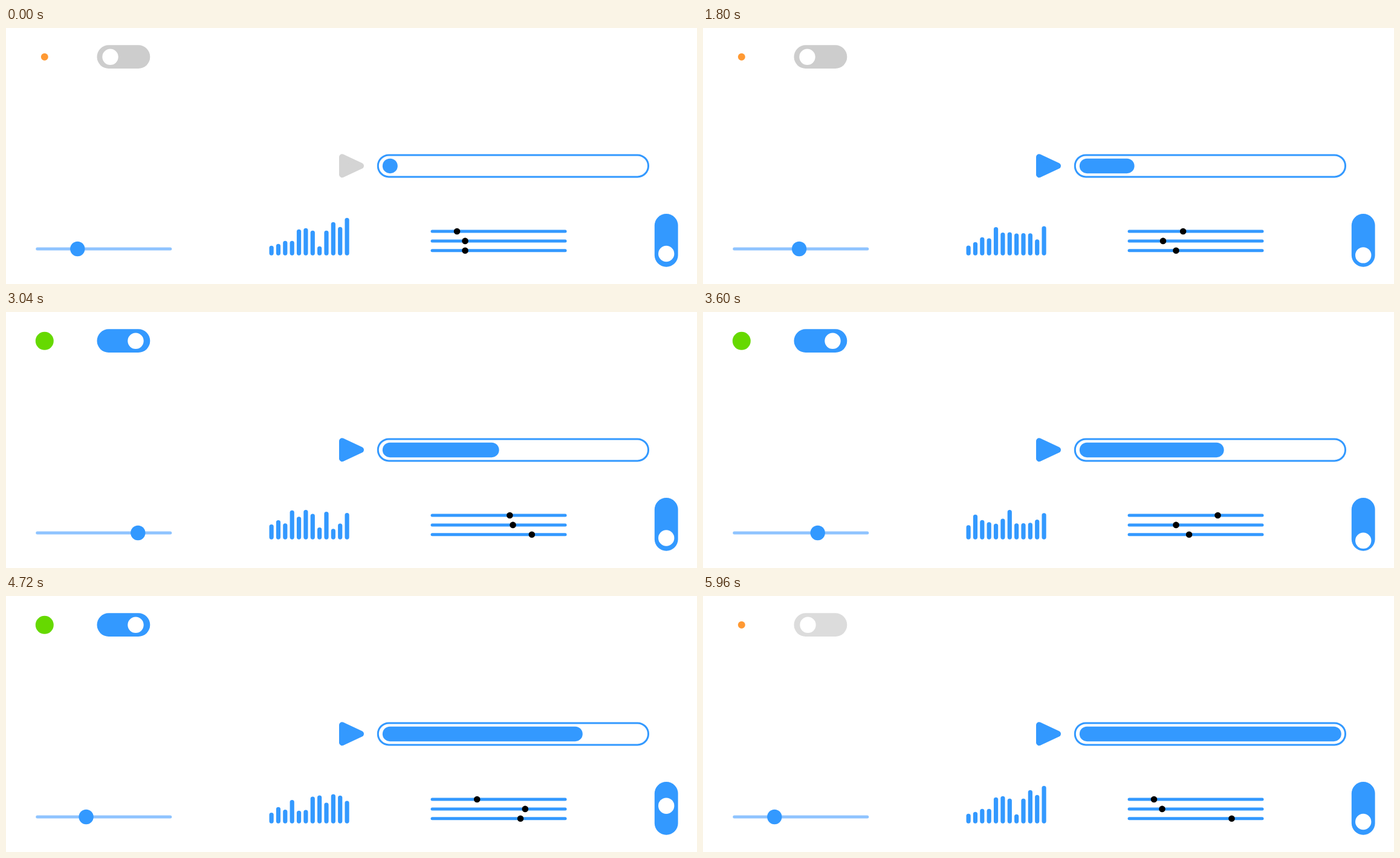
An HTML page with a canvas for the animation above (6 s loop, 1143 by 423 pixels).

```html
<!DOCTYPE html>
<html lang="en">
<head>
<meta charset="utf-8">
<title>Controls</title>
<style>
  html, body { margin: 0; width: 100%; height: 100%; overflow: hidden; background: #fff; }
  canvas { display: block; }
</style>
</head>
<body>
<canvas id="stage" width="1143" height="423"></canvas>
<script>
const ctx = document.getElementById('stage').getContext('2d');
const LOOP = 6000, STEP = 40;
const BLUE = [51, 153, 255], GREY = [205, 205, 205], PALE = [220, 220, 220];
const ORANGE = [255, 153, 51], GREEN = [102, 217, 0];
const blue = rgb(BLUE);

function rgb(c) {
  return `rgb(${c.map(Math.round).join()})`;
}

const mix = (a, b, k) => a + (b - a) * k;
const mixColor = (a, b, k) => rgb(a.map((v, i) => mix(v, b[i], k)));
const clamp = v => Math.min(1, Math.max(0, v));

// Seeded random number for bar i at beat k.
function random(i, k) {
  const v = Math.sin(i * 12.9898 + k * 78.233) * 43758.5453;
  return v - Math.floor(v);
}

function circle(x, y, r, color) {
  ctx.fillStyle = color;
  ctx.beginPath();
  ctx.arc(x, y, r, 0, 7);
  ctx.fill();
}

function pill(x, y, w, h, color) {
  ctx.fillStyle = color;
  ctx.beginPath();
  ctx.roundRect(x, y, w, h, Math.min(w, h) / 2);
  ctx.fill();
}

function playButton(color) {
  ctx.fillStyle = ctx.strokeStyle = color;
  ctx.lineWidth = 10;
  ctx.lineJoin = 'round';
  ctx.beginPath();
  ctx.moveTo(556, 213.3);
  ctx.lineTo(587, 227.8);
  ctx.lineTo(556, 242.2);
  ctx.closePath();
  ctx.fill();
  ctx.stroke();
}

// Bars glide between random heights, one beat per sixth of the loop.
const restHeights = [16, 19, 24, 24, 43, 45, 41, 15, 41, 55, 47, 62];
const BEATS = 6;

function barHeight(i, t) {
  const beat = t / (LOOP - STEP) * BEATS, k = Math.floor(beat);
  const level = n => n % BEATS ? 14 + 40 * random(i, n) : restHeights[i];
  return mix(level(k), level(k + 1), beat - k);
}

// Dips far, then overshoots slightly, every two seconds until it rests.
function leverY(t) {
  if (t > 5000) return 373;
  const swing = 1 - Math.abs(t % 1000 / 500 - 1);
  return 373 + swing * (t % 2000 < 1000 ? -47 : 6);
}

function draw(t) {
  const ramp = (start, length) => clamp((t - start) / length);

  ctx.fillStyle = '#fff';
  ctx.fillRect(0, 0, 1143, 423);

  const lamp = ramp(2000, 500) - ramp(5000, 500);
  const swell = 1 - Math.abs(2 * lamp - 1);
  circle(63.8, 47.8, mix(6, 15, lamp) + 12.5 * swell, mixColor(ORANGE, GREEN, lamp));

  const on = ramp(1880, 400) - ramp(4900, 400), late = t > 3000;
  pill(150.5, 28.3, 87.8, 38.8, mixColor(late ? PALE : GREY, BLUE, on));
  circle(mix(late ? 173.5 : 172.5, 214.5, on), 47.8, 13.2, '#fff');

  playButton(t < 1000 ? '#d4d4d4' : blue);
  ctx.strokeStyle = blue;
  ctx.lineWidth = 3;
  ctx.beginPath();
  ctx.roundRect(615.3, 209.9, 447.2, 36, 18);
  ctx.stroke();
  pill(622.8, 215.7, mix(25, 433, ramp(1000, 4960)), 24.5, blue);

  pill(49.3, 362.5, 225, 5, '#8fc4ff');
  circle(118.3 + 100 * (ramp(1000, 1960) - ramp(3040, 1960)), 365, 12.2, blue);

  restHeights.forEach((_, i) => {
    const h = barHeight(i, t);
    pill(435.5 + i * 11.36, 375.7 - h, 7.2, h, blue);
  });

  const mixer = [
    746 + 53.5 * ramp(0, 2000) + 65 * ramp(2000, 2000) - 118.5 * ramp(4000, 1000),
    759.5 - 48.5 * ramp(0, 1000) + 127.5 * ramp(1000, 2040) - 96 * ramp(3040, 960)
      + 161.5 * ramp(4000, 1000) - 144.5 * ramp(5000, 960),
    759.5 + 115 * (ramp(0, 930) - ramp(1000, 1000) + ramp(2000, 930)
      - ramp(3000, 980) + ramp(3980, 930))
  ];
  mixer.forEach((x, i) => {
    const y = 336 + i * 15.9;
    pill(702.5, y - 2.5, 225, 5, blue);
    circle(x, y, 5.3, '#000');
  });

  pill(1072.8, 307, 38.8, 87.8, blue);
  circle(1092.2, leverY(t), 13.2, '#fff');
}

function frame() {
  draw(Math.floor(performance.now() % LOOP / STEP) * STEP);
  requestAnimationFrame(frame);
}
frame();
</script>
</body>
</html>
```
